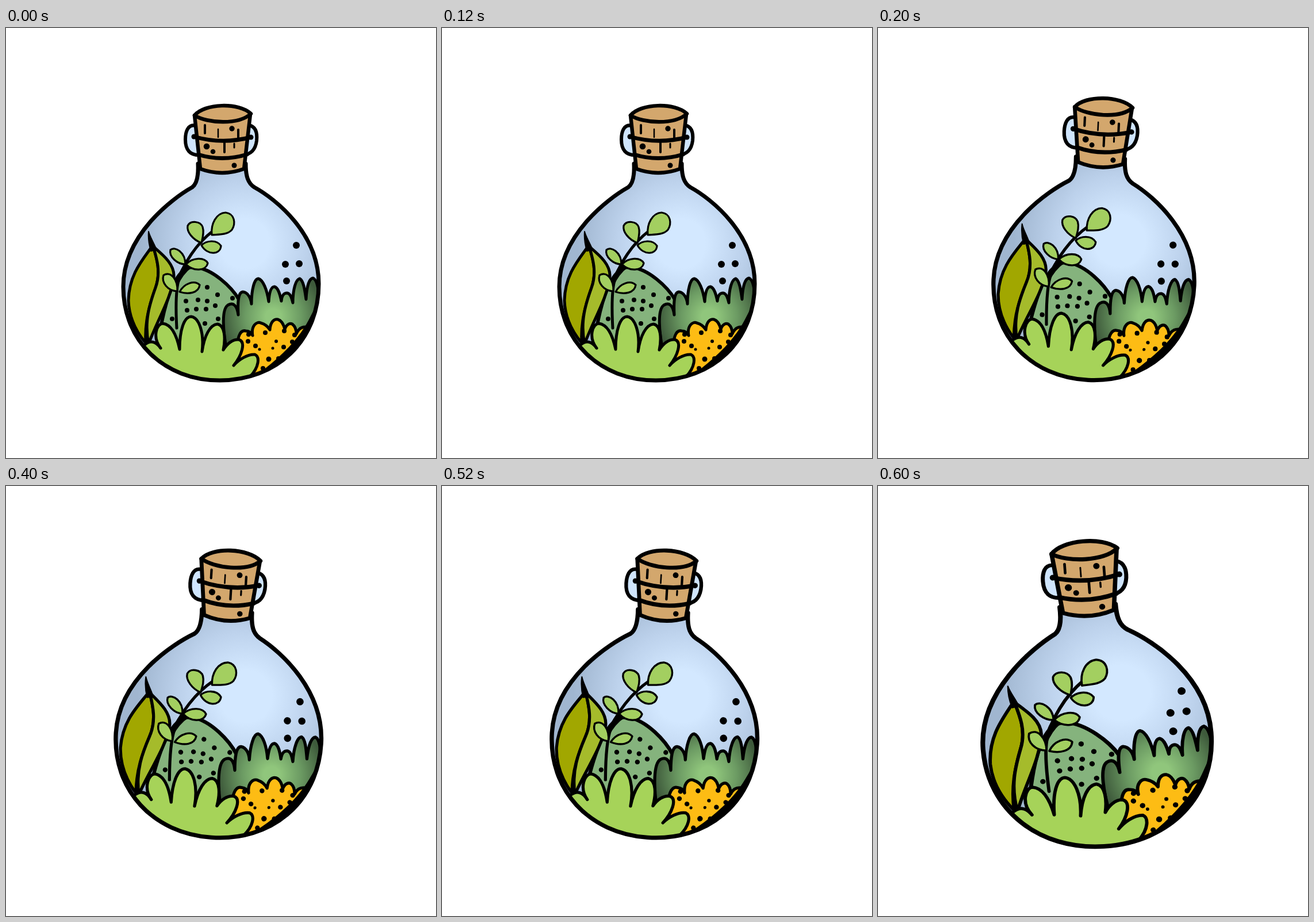
An HTML page for the animation above (0.8 s loop, 748 by 748 pixels).

```html
<!DOCTYPE html>
<html lang="en">
<head>
<meta charset="utf-8">
<title>Bottle garden</title>
<style>
html, body { margin: 0; width: 100%; height: 100%; overflow: hidden; background: #fff; }
svg { display: block; width: 100%; height: 100%; }
</style>
</head>
<body>
<svg viewBox="0 0 748 748">
  <defs>
    <radialGradient id="glass" gradientUnits="userSpaceOnUse" cx="415" cy="375" r="180">
      <stop offset=".24" stop-color="#d3e8ff"/>
      <stop offset=".6" stop-color="#bdd2ec"/>
      <stop offset="1" stop-color="#a0b6d0"/>
    </radialGradient>
    <radialGradient id="bush" gradientUnits="userSpaceOnUse" cx="465" cy="502" r="88">
      <stop offset=".15" stop-color="#90c67c"/>
      <stop offset=".55" stop-color="#6c9b63"/>
      <stop offset="1" stop-color="#3e5a3b"/>
    </radialGradient>
    <path id="body" d="M334 236C335 258 332 271 324 277C290 296 204 360 204 450C204 545 275 613 372 613C470 613 544 545 544 445C544 358 470 298 432 277C421 270 417 258 417 236"/>
    <clipPath id="inside"><use href="#body"/></clipPath>
  </defs>
  <g id="bottle" stroke="#000" stroke-linecap="round" stroke-linejoin="round">
    <g fill="#cfe5fd" stroke-width="6">
      <path d="M331 170C315 166 312 183 312 194C312 212 320 222 338 221"/>
      <path d="M423 169C436 172 437 186 436 196C434 212 426 220 412 221"/>
    </g>
    <use href="#body" fill="url(#glass)"/>
    <g clip-path="url(#inside)" stroke-width="5">
      <path fill="#85b37d" stroke-width="6" d="M262 565C275 470 295 412 330 416C360 420 392 450 405 472L420 565Z"/>
      <g id="hillDots"></g>
      <path fill="#a1a700" d="M254 380C236 405 214 430 213 474C214 505 228 530 243 548C241 510 250 480 260 452C270 425 262 400 256 380Z"/>
      <path fill="#a5bb2b" d="M256 380C272 394 293 410 292 432C288 470 262 510 248 550C240 510 250 480 260 452C270 425 262 400 256 380Z"/>
      <path fill="#000" stroke-width="2" d="M248 354C251 365 257 373 262 386L252 388C249 378 247 366 248 354Z"/>
      <path fill="none" d="M297 522C295 485 295 455 301 436C309 411 330 376 360 353"/>
      <path fill="#000" stroke-width="2" d="M298 448C298 430 306 416 314 409L322 416C312 424 304 434 298 448Z"/>
      <g id="leaflets" fill="#a3cf60" stroke-width="3.2"></g>
      <path fill="url(#bush)" d="M384 560C378 530 374 490 386 482C396 476 402 484 404 499C403 480 403 460 412 459C421 460 426 470 427 480C427 455 432 436 439 436C447 438 454 455 457 476C458 460 461 450 467 450C474 452 477 465 479 475C480 465 483 461 489 461C495 462 497 470 499 478C499 455 504 437 511 436C518 440 520 458 522 472C523 450 527 436 534 435C541 438 543 452 545 470L540 560Z"/>
      <path fill="#fdbc14" d="M400 570C402 540 406 524 417 527C423 527 427 531 429 535C426 518 436 510 443 513C451 515 456 520 459 525C460 510 467 506 473 507C480 509 483 516 485 524C488 515 494 513 498 515C503 519 505 525 505 532C509 522 516 518 528 521L510 565L435 615Z"/>
      <g id="bushDots"></g>
      <path fill="#a6d359" d="M240 552Q256 538 269 557C254 538 262 514 273 514C288 516 297 535 302 559C302 525 310 502 322 502C336 504 345 530 341 563C345 535 355 516 368 515C381 518 382 540 378 560C384 550 394 541 405 542C418 546 410 570 396 587C405 577 420 567 433 568C442 572 440 590 425 606L400 640L240 640Z"/>
      <path fill="#000" stroke="none" d="M546 470C540 540 490 595 425 611C468 582 508 545 528 505Z"/>
      <g id="airDots"></g>
    </g>
    <use href="#body" fill="none" stroke-width="7"/>
    <g fill="#d3a76d" stroke-width="6.5">
      <path d="M328 152L338 245Q376 259 414 245L425 150Z"/>
      <path d="M328 152C345 131 405 129 426 149C405 169 350 166 328 152Z"/>
      <path fill="none" stroke-width="7" d="M327 189Q376 203 426 190M334 220Q376 233 419 220"/>
    </g>
    <g id="corkMarks"></g>
  </g>
</svg>
<script>
const get = id => document.getElementById(id);
const dot = ([x, y, r = 4]) => `<circle cx="${x}" cy="${y}" r="${r}" stroke="none"/>`;
const bar = ([x, top, end, w]) => `<path d="M${x} ${top}V${end}" stroke-width="${w}"/>`;
const shape = d => `<path d="${d}"/>`;
const fill = (id, make, list) => { get(id).innerHTML += list.map(make).join(""); };

fill("hillDots", dot, [[350, 451], [368, 464], [334, 473], [313, 475], [350, 475], [364, 483],
  [315, 491], [331, 489], [348, 489], [289, 506], [369, 506], [346, 514], [394, 470]]);
fill("bushDots", dot, [[421, 545], [434, 553], [451, 530], [470, 545, 3], [464, 557, 2.5],
  [441, 559, 2.5], [483, 555], [498, 546], [484, 527], [502, 534], [457, 576, 4.5],
  [474, 575], [447, 592], [422, 533]]);
fill("airDots", dot, [[505, 378, 6], [486, 411, 6], [510, 410, 6], [488, 440, 6]]);
fill("corkMarks", dot, [[393, 175, 4.7], [349, 206, 5.3], [360, 215, 4.3], [397, 239, 4.5],
  [327, 189, 4.5], [426, 190, 4.5]]);
fill("corkMarks", bar, [[346, 169, 183, 4], [369, 176, 190, 2.5], [404, 177, 191, 4],
  [380, 200, 216, 4], [397, 201, 208, 3]]);
fill("leaflets", shape, [
  "M358 360C356 340 366 322 382 321C398 323 400 340 393 351C385 360 370 359 358 360Z",
  "M340 374C325 368 314 355 316 344C321 334 338 336 342 346C345 355 342 365 340 374Z",
  "M340 378C348 370 366 367 374 379C373 395 350 396 340 378Z",
  "M312 411C298 411 283 398 286 386C294 379 312 390 312 411Z",
  "M313 411C325 399 345 398 351 409C348 423 326 424 313 411Z",
  "M298 458C281 457 270 443 274 430C287 422 299 438 298 458Z",
  "M302 459C310 444 328 438 337 447C335 461 318 464 302 459Z"
]);

// Each pose is a linear map and the place of the pivot.
const STEP = 200;
const PIVOT = [356.95, 427.03];
const POSES = [
  [1, 0, 0, 1, ...PIVOT],
  [1.026, .047, -.047, 1.026, 359, 420.9],
  [1.049, .071, -.062, 1.045, 353.1, 416],
  [1.168, -.071, .086, 1.11, 359.4, 421.6]
];

function draw(time) {
  const pose = POSES[Math.floor(time / STEP) % POSES.length];
  get("bottle").setAttribute("transform",
    `matrix(${pose.join(" ")}) translate(${-PIVOT[0]} ${-PIVOT[1]})`);
}

const start = performance.now();
function tick() {
  draw(performance.now() - start);
  requestAnimationFrame(tick);
}
tick();
</script>
</body>
</html>
```
